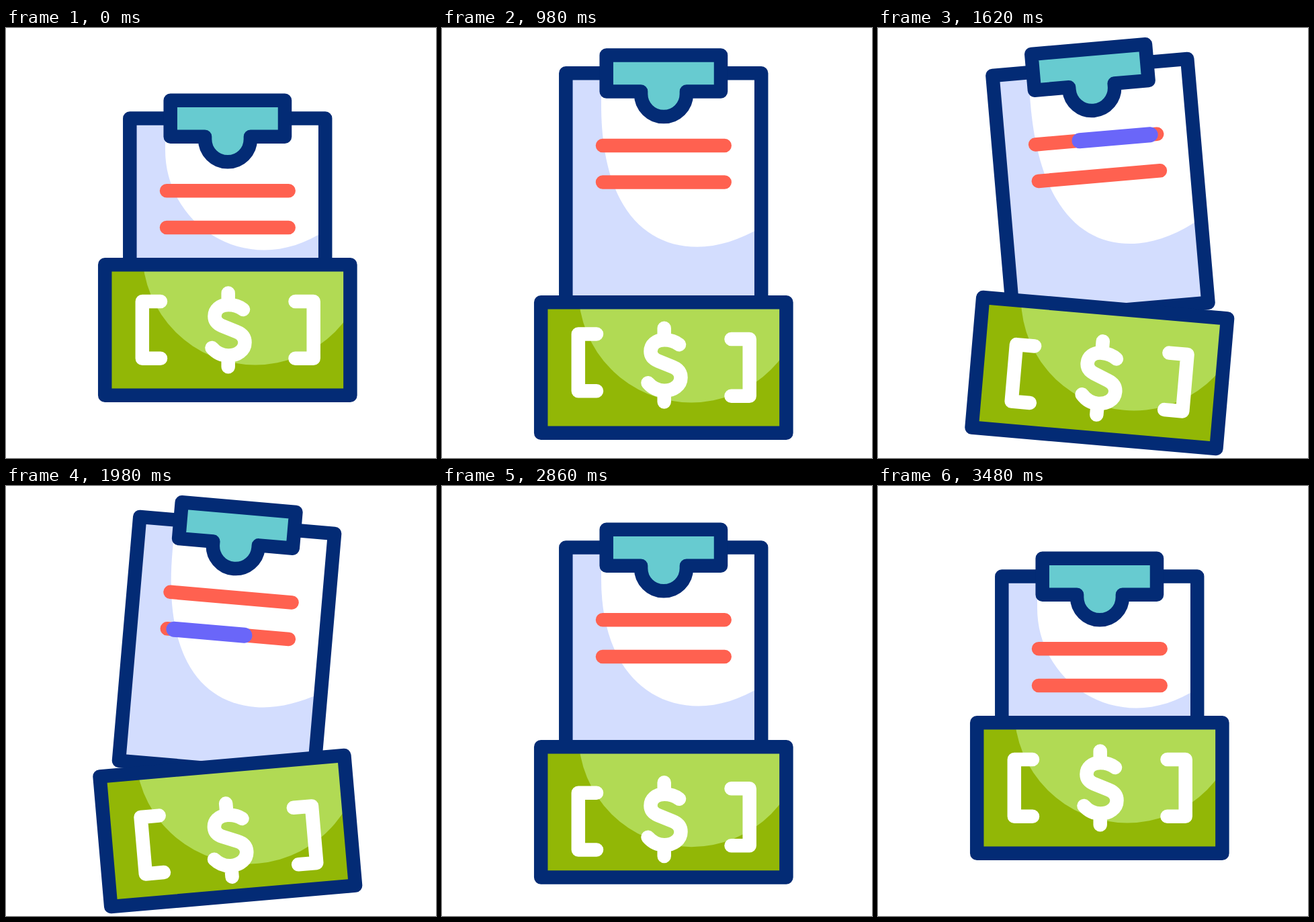
Recreate the animation shown at these times as an HTML page. Size 640 by 640 pixels, loop 3.62 s.

```html
<!DOCTYPE html>
<html lang="en">
<head>
<meta charset="utf-8">
<title>Clipboard and banknote</title>
<style>
  html, body { margin: 0; width: 100%; height: 100%; overflow: hidden; background: #fff; }
  svg { display: block; width: 100%; height: 100%; }
  .line { fill: none; stroke-width: 20.5; stroke-linecap: round; stroke-linejoin: round; }
  .navy { stroke: #032b75; }
  .red { stroke: #ff6150; }
  .white { stroke: #fff; }
  .scan { stroke: #6a66f9; stroke-width: 23; }
</style>
</head>
<body>
<svg viewBox="0 0 640 640">
  <defs>
    <clipPath id="paperArea"><rect x="184.3" y="134.6" width="290.9" height="364.2"/></clipPath>
    <clipPath id="noteArea"><rect x="147.2" y="352.3" width="365.2" height="194.4"/></clipPath>
  </defs>

  <g id="board">
    <g clip-path="url(#paperArea)">
      <rect x="184" y="134" width="292" height="366" fill="#d3ddfe"/>
      <path id="shine" fill="#fff"/>
    </g>
    <rect class="line navy" x="184.3" y="134.6" width="290.9" height="364.2"/>
    <path class="line red" d="M239 242.2H420.7M239 296.9H420.7"/>
    <path class="line scan" id="scan1"/>
    <path class="line scan" id="scan2"/>
    <path class="line navy" style="fill:#67cbd0"
      d="M244.7 107.7H415V161.7H363.9V165.5A33.9 33.9 0 0 1 296.1 165.5V161.7H244.7Z"/>
  </g>

  <g id="note">
    <g clip-path="url(#noteArea)">
      <rect x="147" y="352" width="366" height="195" fill="#92b706"/>
      <circle cx="371" cy="333.5" r="168" fill="#b1da54"/>
    </g>
    <rect class="line navy" x="147.2" y="352.3" width="365.2" height="194.4"/>
    <path class="line white" id="left" d="M230 407H202.8V491.8H230"/>
    <path class="line white" id="dollar" d="M330.7 394.6V411M330.7 488V504.2
      M353 419C346 413.5 338 412 331 412C318 412 310.5 419.5 310.5 429
      C310.5 437 316 441 322 443.5L343 452C350.5 455 355.5 460 355.5 468
      C355.5 480 344 487.5 331 487.5C321 487.5 313 483.5 306.5 476"/>
    <path class="line white" id="right" d="M430.5 407H457.7V491.8H430.5"/>
  </g>
</svg>
<script>
const LOOP = 3620, STEP = 20;
const $ = id => document.getElementById(id);
const clamp = u => Math.max(0, Math.min(1, u));
const ease = u => (u = clamp(u), u * u * (3 - 2 * u));

// Eased interpolation through [time, value] keys.
function track(keys, t) {
  if (t <= keys[0][0]) return keys[0][1];
  for (let i = 1; i < keys.length; i++) {
    const [t0, a] = keys[i - 1], [t1, b] = keys[i];
    if (t < t1) return a + (b - a) * ease((t - t0) / (t1 - t0));
  }
  return keys[keys.length - 1][1];
}

const SPREAD = [[200, 0], [1200, 1], [2400, 1], [3400, 0]];
const TILT = [[1200, 0], [1600, 5], [2000, -5], [2400, 0]];
const BOB = [[0, 0], [400, 19.2], [1000, -19.2], [1600, 19.2],
             [2200, -19.2], [2800, 19.2], [3200, 0]];

function place(id, dy, angle, cy) {
  $(id).setAttribute('transform', `translate(0 ${dy}) rotate(${angle} 329.8 ${cy})`);
}

function bob(id, t) {
  $(id).setAttribute('transform', `translate(0 ${track(BOB, t)})`);
}

// The white area keeps its upper edge while its lower end stretches.
function shine(p) {
  const x = 384.5 - 5 * p, drop = 71.4 * p, b = 330.5 + drop;
  $('shine').setAttribute('d',
    `M237 130V182C237 ${263.7 + drop} ${x - 81.7 - 2 * p} ${b} ${x} ${b}` +
    `C${x + 30} ${b} ${x + 62} ${b - 10} 475 ${b - 29}V130Z`);
}

// A stroke whose head runs ahead of its tail.
function scan(id, y, t) {
  const at = u => 239 + 181.7 * ease(u);
  const head = at(t / 490), tail = at((t - 220) / 490);
  $(id).setAttribute('d', head - tail > 0.05 ? `M${tail} ${y}H${head}` : '');
}

function draw(t) {
  const p = track(SPREAD, t), tilt = track(TILT, t);
  place('board', -76.8 * p, -tilt, 302.5);
  place('note', 64 * p, tilt, 449.5);
  shine(p);
  scan('scan1', 242.2, t - 1200);
  scan('scan2', 296.9, t - 1690);
  bob('left', t - 200);
  bob('dollar', t - 240);
  bob('right', t - 280);
}

const start = performance.now();
function tick() {
  const t = (performance.now() - start) % LOOP;
  draw(Math.floor(t / STEP) * STEP);
  requestAnimationFrame(tick);
}
draw(0);
requestAnimationFrame(tick);
</script>
</body>
</html>
```
